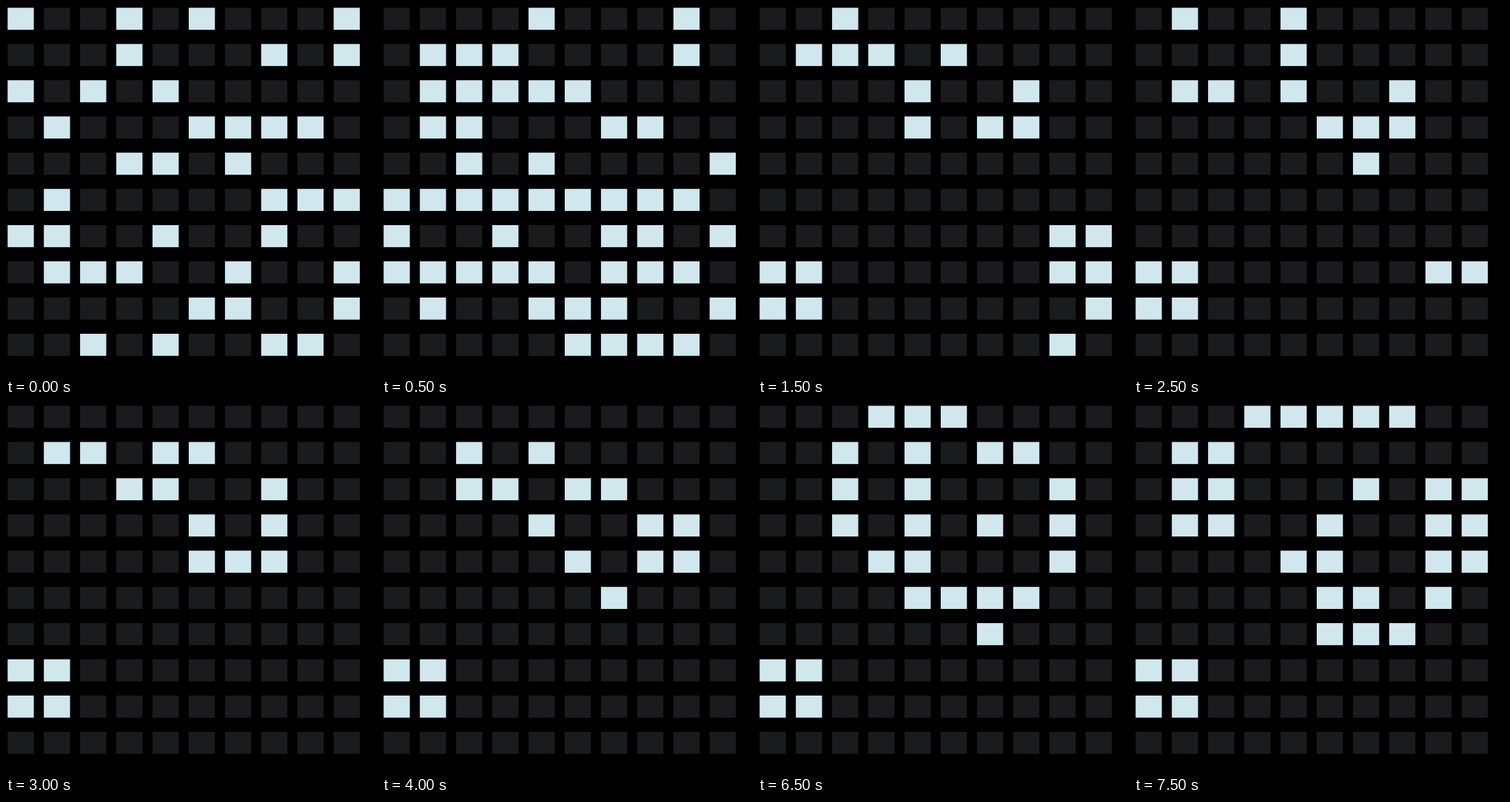
An HTML page with a canvas that plays this animation: 500x500 px, repeating every 8 s.

```html
<!DOCTYPE html>
<html>
<head>
<meta charset="utf-8">
<title>Game of Life</title>
<style>
html, body { margin: 0; width: 100%; height: 100%; overflow: hidden; background: #000; }
canvas { display: block; }
</style>
</head>
<body>
<canvas id="stage" width="500" height="500"></canvas>
<script>
const ctx = document.getElementById('stage').getContext('2d');
const PITCH = 48.95, LEFT = 2.2, TOP = 2.4, WIDTH = 35.4, HEIGHT = 29.8;
const STEP_MS = 500, STEPS = 16;
const LIVE = '#d1e7ee', DEAD = '#1a1b1c';

const seed = [
  '#..#.#...#',
  '...#...#.#',
  '#.#.#.....',
  '.#...####.',
  '...##.#...',
  '.#.....###',
  '##..#..#..',
  '.###..#..#',
  '.....##..#',
  '..#.#..##.'
].map(row => [...row].map(c => c === '#'));

// Cells beyond the border count as dead.
function neighbours(grid, r, c) {
  let n = 0;
  for (let y = r - 1; y <= r + 1; y++)
    for (let x = c - 1; x <= c + 1; x++)
      if ((y !== r || x !== c) && grid[y]?.[x]) n++;
  return n;
}

const evolve = grid => grid.map((row, r) => row.map((alive, c) => {
  const n = neighbours(grid, r, c);
  return n === 3 || (alive && n === 2);
}));

const generations = [seed];
while (generations.length < STEPS) generations.push(evolve(generations.at(-1)));

function draw(grid) {
  ctx.fillStyle = '#000';
  ctx.fillRect(0, 0, 500, 500);
  grid.forEach((row, r) => row.forEach((alive, c) => {
    ctx.fillStyle = alive ? LIVE : DEAD;
    ctx.fillRect(LEFT + c * PITCH, TOP + r * PITCH, WIDTH, HEIGHT);
  }));
}

const start = performance.now();
function tick() {
  const step = Math.floor((performance.now() - start) / STEP_MS) % STEPS;
  draw(generations[step]);
  requestAnimationFrame(tick);
}
tick();
</script>
</body>
</html>
```
